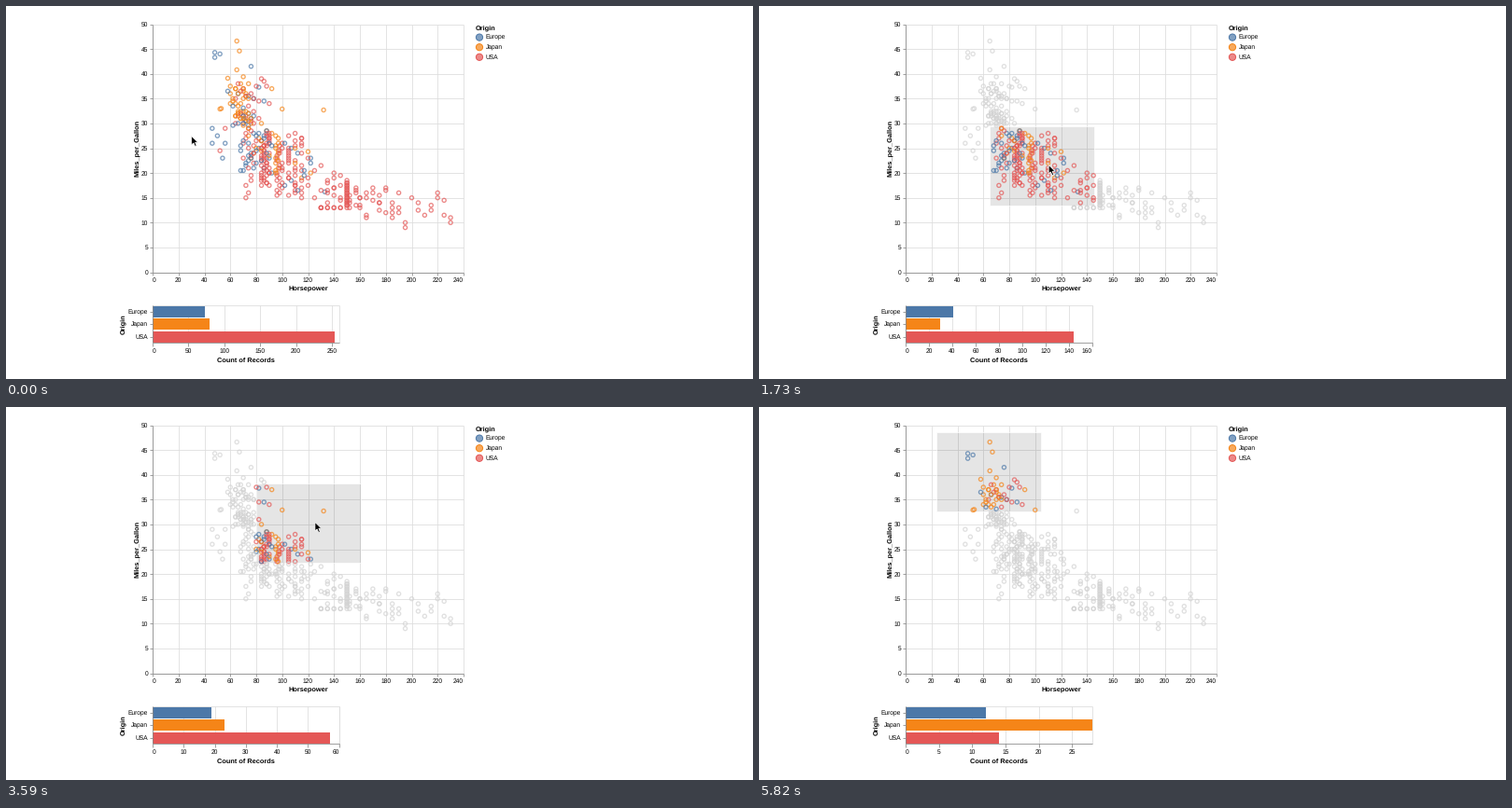
A matplotlib script for the animation above (6190 ms loop, 800 by 400 pixels).

```python
import math

import matplotlib.pyplot as plt
import numpy as np
from matplotlib.animation import FuncAnimation
from matplotlib.collections import LineCollection
from matplotlib.patches import Circle, Polygon, Rectangle

plt.rcParams["font.family"] = "Liberation Sans"
plt.rcParams["text.hinting"] = "no_hinting"

LOOP, STEP = 6190, 10
PX = 0.72  # points per pixel at 100 dpi
LEFT, RIGHT, TOP, BOTTOM = 157, 490, 19.5, 285.5
BAR_RIGHT, BAND = 356.7, 13.33
GRID, AXIS, FADED = "#dddddd", "#888888", "#d3d3d3"
ORIGINS = ("Europe", "Japan", "USA")
COLORS = ("#4c78a8", "#f58518", "#e45756")
UNPLOTTED = np.array([5, 0, 7])  # records lacking a value on one axis
TITLE_X = {"Europe": 125, "Japan": 128.5, "USA": 132}

rng = np.random.default_rng(11)

# Clusters: record count, mpg range, horsepower range. Pairs: horsepower, mpg.
EUROPE = [
    (8, 33.1, 37.3, 58, 88), (3, 26, 29, 46, 60), (4, 29.6, 30, 62, 76),
    (30, 20, 28.5, 68, 92), (10, 16.5, 26, 102, 125), (6, 30.5, 32, 70, 78),
    (48, 44.3), (48, 43.3), (52, 44), (76, 41.5), (46, 26), (54, 23), (133, 16.2),
]
JAPAN = [
    (19, 33.5, 38, 60, 74), (4, 32.4, 32.4, 66, 74), (13, 30.5, 32, 64, 76),
    (3, 29.6, 30, 70, 90), (12, 23, 29, 74, 92), (13, 20, 27.5, 95, 97),
    (3, 19, 25, 110, 115), (65, 46.6), (67, 44.6), (65, 40.8), (70, 39.4),
    (58, 39.1), (92, 37), (100, 32.9), (52, 32.9), (53, 33), (132, 32.7),
    (120, 24.3), (122, 20),
]
USA = [
    (14, 33.5, 39, 64, 90), (6, 30.5, 32.4, 66, 84), (3, 30, 30, 64, 84),
    (2, 24.5, 29, 52, 60), (7, 15, 22, 72, 78), (11, 23, 29, 70, 80),
    (47, 17.5, 28, 84, 90), (23, 15.5, 26, 96, 100), (35, 15, 28, 105, 115),
    (7, 15, 23, 120, 130), (9, 13, 13, 130, 145), (14, 14, 20, 135, 145),
    (22, 13, 18.5, 150, 150), (8, 13, 17, 152, 157), (25, 11, 17, 160, 190),
    (6, 9, 15, 195, 210), (8, 10, 16, 215, 230),
]

# Pointer path: time, x, y
PATH = np.array([
    (0, 199, 140), (240, 185, 125.5), (840, 282, 198), (1050, 297, 210),
    (1090, 297, 208), (1370, 248.5, 167.5), (1490, 258, 167), (1730, 310.5, 171),
    (2330, 405.5, 203.5), (2570, 439, 209), (2730, 441, 209.5),
    (3190, 441, 209.5), (3350, 425, 196), (3670, 300, 100), (4070, 254.5, 72),
    (4400, 254, 71.5), (4460, 254, 70.5), (4720, 254, 70.5), (4820, 253.5, 69),
])
PRESS, RELEASE, GRAB, HIDE = 240, 1050, 1370, 5780


def px_x(hp):
    return LEFT + hp * (RIGHT - LEFT) / 240


def px_y(mpg):
    return BOTTOM - mpg * (BOTTOM - TOP) / 50


def cluster(n, low, high, weak, strong):
    """Records on a grid of half miles and regular horsepower columns."""
    mpg = np.clip(np.round(np.linspace(low, high, n) * 2) / 2, low, high)
    columns = np.arange(weak, strong + 1, 2 if strong <= 100 else 5)
    hp = columns[np.arange(n) * len(columns) // n]
    return np.column_stack([rng.permutation(hp), mpg])


def records(rows):
    return np.vstack([cluster(*r) if len(r) == 5 else r for r in rows])


def pointer(t):
    return np.array([np.interp(t, PATH[:, 0], PATH[:, k]) for k in (1, 2)])


def brush(t):
    """Top-left corner and size of the selection, or None before the drag."""
    if t <= PRESS:
        return None
    corner = pointer(PRESS)
    size = pointer(min(t, RELEASE)) - corner
    if t > GRAB:
        corner = corner + pointer(t) - pointer(GRAB)
    return corner, size


def tick_step(top, count):
    raw = top / count
    power = 10 ** math.floor(math.log10(raw))
    err = raw / power
    return power * (10 if err >= 50 ** 0.5 else 5 if err >= 10 ** 0.5
                    else 2 if err >= 2 ** 0.5 else 1)


fig = plt.figure(figsize=(8, 4), dpi=100, facecolor="white")
ax = fig.add_axes([0, 0, 1, 1])
ax.set(xlim=(0, 800), ylim=(400, 0))
ax.axis("off")


def label(x, y, s, ha="center", size=6.67, bold=False, turn=False):
    """Text whose capitals are centred on (x, y)."""
    drop = 0.36 * size
    return ax.text(x + drop * turn, y + drop * (not turn), s, ha=ha, va="baseline",
                   rotation=90 * turn, rotation_mode="anchor", fontsize=size * PX,
                   weight="bold" if bold else "normal", color="black", zorder=6)


def title(x, y, s, ha="center", turn=False):
    return label(x, y, s, ha, 7.33, True, turn)


def lines(segments, color, z):
    return ax.add_collection(
        LineCollection(segments, colors=color, linewidths=0.8 * PX, zorder=z),
        autolim=False)


def x_label(x, right, y, s):
    """Axis label kept flush with both ends of its axis."""
    ha = "left" if x < LEFT + 0.5 else "right" if x > right - 0.5 else "center"
    return label(x, y, s, ha)


def draw_frame():
    grid, axis = [], [[(LEFT, TOP), (LEFT, BOTTOM)], [(LEFT, BOTTOM), (RIGHT, BOTTOM)]]
    for hp in range(0, 241, 20):
        x = px_x(hp)
        grid.append([(x, TOP), (x, BOTTOM)])
        axis.append([(x, BOTTOM), (x, BOTTOM + 3.3)])
        x_label(x, RIGHT, 293.5, str(hp))
    for mpg in range(0, 51, 5):
        y = px_y(mpg)
        grid.append([(LEFT, y), (RIGHT, y)])
        axis.append([(LEFT - 3.3, y), (LEFT, y)])
        label(152.3, y, str(mpg), "right")
    lines(grid, GRID, 1)
    lines(axis, AXIS, 5)
    title(323.5, 303, "Horsepower")
    title(139, 152.5, "Miles_per_Gallon", turn=True)
    title(503, 22.5, "Origin", "left")
    for i, (name, color) in enumerate(zip(ORIGINS, COLORS)):
        y = 33.6 + 10.6 * i
        ax.add_patch(Circle((507, y), 3.6, fc=(color, 0.7), ec=color, lw=PX))
        label(513.5, y, name, "left")


def draw_bars(counts):
    shown = [i for i in range(3) if counts[i]]
    height = BAND * len(shown)
    top = 321.3 if len(shown) > 1 else 326.3
    base = top + height
    peak = max(1, max(counts))
    nice = tick_step(peak, 10)
    domain = math.ceil(peak / nice - 1e-9) * nice
    step = tick_step(domain, 8)
    scale = (BAR_RIGHT - LEFT) / domain

    grid = [[(LEFT, top), (BAR_RIGHT, top)], [(BAR_RIGHT, top), (BAR_RIGHT, base)]]
    axis = [[(LEFT, top), (LEFT, base)], [(LEFT, base), (BAR_RIGHT, base)]]
    parts = []
    for k in range(int(domain / step + 1e-9) + 1):
        x = LEFT + k * step * scale
        grid.append([(x, top), (x, base)])
        axis.append([(x, base), (x, base + 3.3)])
        text = f"{k * step:.{0 if step >= 1 else 1}f}"
        parts.append(x_label(x, BAR_RIGHT, base + 8, text))
    for row, i in enumerate(shown):
        y = top + BAND * (row + 0.5)
        axis.append([(LEFT - 3.3, y), (LEFT, y)])
        parts.append(label(152.3, y, ORIGINS[i], "right"))
        parts.append(ax.add_patch(Rectangle((LEFT, y - 6), counts[i] * scale, 12,
                                            fc=COLORS[i], lw=0, zorder=3)))
    widest = ORIGINS[shown[0]] if shown else "USA"
    parts += [
        lines(grid, GRID, 1), lines(axis, AXIS, 5),
        title(TITLE_X[widest], top + height / 2, "Origin", turn=True),
        title(256.8, base + 17.8, "Count of Records"),
    ]
    return parts


groups = [records(rows) for rows in (EUROPE, JAPAN, USA)]
origin = np.repeat(np.arange(3), [len(g) for g in groups])
cars = np.vstack(groups)
order = rng.permutation(len(cars))
origin, cars = origin[order], cars[order]
spots = np.column_stack([px_x(cars[:, 0]), px_y(cars[:, 1])])
palette = np.array(COLORS + (FADED,))

draw_frame()
dots = ax.scatter(*spots.T, s=(4.1 * PX) ** 2, facecolors="none",
                  edgecolors=palette[origin], linewidths=1.33 * PX, alpha=0.7, zorder=4)
area = ax.add_patch(Rectangle((0, 0), 0, 0, fc=("#333333", 0.125), ec="white",
                              lw=0.67 * PX, zorder=2))
ARROW = np.array([(0, 0), (0, 9.4), (2.2, 7.4), (3.8, 11), (5.4, 10.3),
                  (3.9, 6.8), (6.8, 6.6)])
arrow = ax.add_patch(Polygon(ARROW, fc="black", ec="white", lw=0.7 * PX, zorder=8))
bars = []


def held(t):
    """Time of the last screen refresh, about every 40 ms."""
    phase = 0 if t < 700 else 10 if t < 2740 else 30 if t < 4200 else 20
    return t - (t - phase) % 40


def update(n):
    t = max(0, held(n * STEP))
    box = brush(t)
    inside = np.ones(len(spots), bool)
    extra = UNPLOTTED
    if box:
        corner, size = box
        inside = np.all((spots >= corner) & (spots <= corner + size), axis=1)
        extra = 0 * UNPLOTTED
        area.set_bounds(*corner, *size)
    area.set_visible(box is not None)
    dots.set_edgecolor(palette[np.where(inside, origin, 3)])

    counts = np.bincount(origin[inside], minlength=3) + extra
    for part in bars:
        part.remove()
    bars[:] = draw_bars(counts.tolist())

    arrow.set_xy(ARROW + pointer(t) + (-0.3, -0.5))
    arrow.set_visible(t < HIDE)
    return []


anim = FuncAnimation(fig, update, frames=LOOP // STEP, interval=STEP,
                     repeat=True, repeat_delay=0, blit=False)
plt.show()
```
